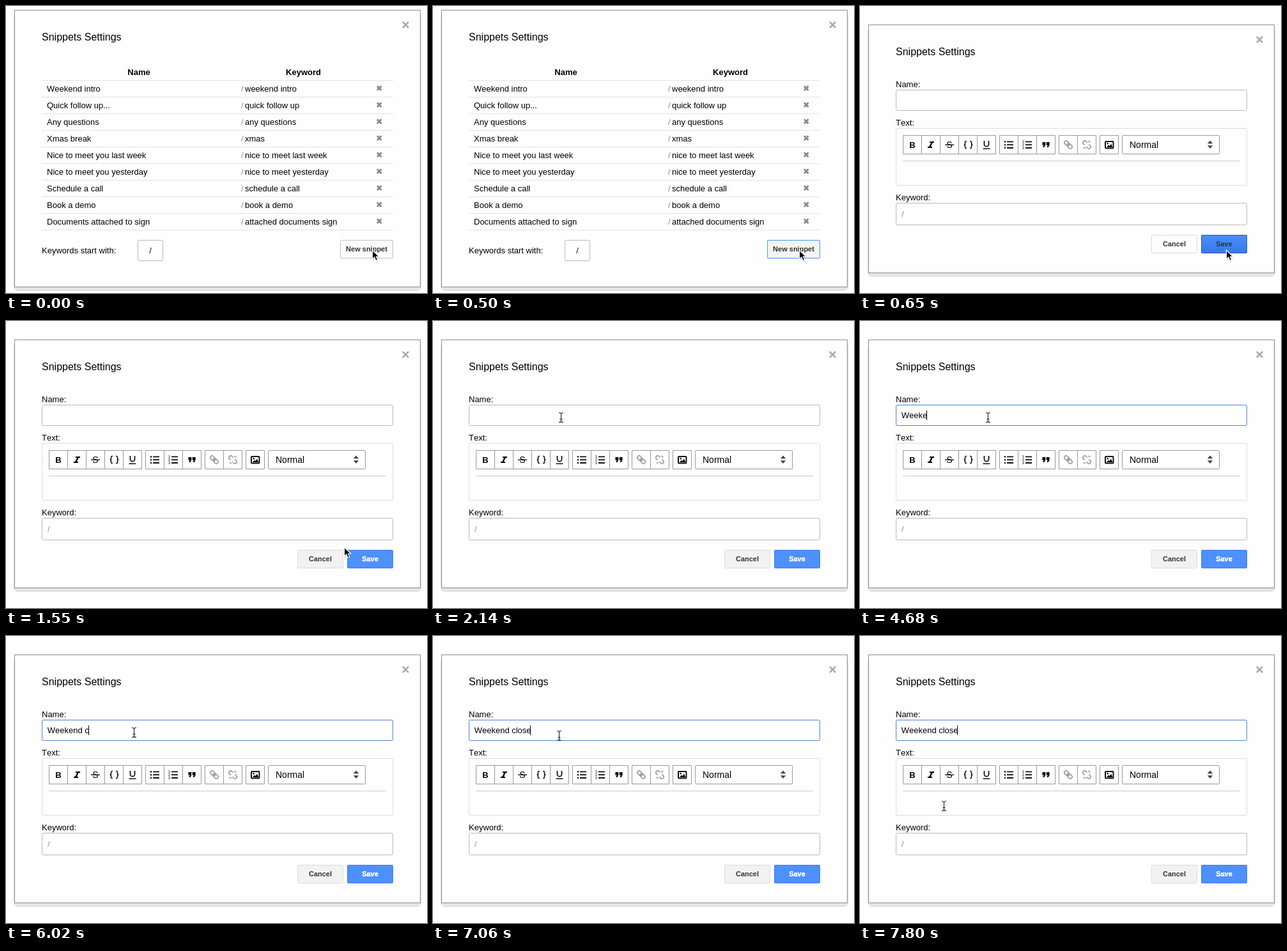
An HTML page that plays this animation: 659 px wide and 449 px high, repeating every 8000 ms.

```html
<!DOCTYPE html>
<html lang="en">
<head>
<meta charset="utf-8">
<title>Snippets Settings</title>
<style>
  html, body { margin: 0; width: 100%; height: 100%; overflow: hidden; background: #fff; }
  svg { display: block; width: 659px; height: 449px; }
  text { font: 13px "Liberation Sans", Arial, sans-serif; font-kerning: none; white-space: pre; }
  .title { font-size: 16px; }
  .bold { font-weight: bold; }
  .mid { text-anchor: middle; }
  .btn { font-size: 11px; font-weight: bold; text-anchor: middle; fill: #333; }
  .slash { fill: #8c8c8c; }
  .dialog { fill: #fefefe; stroke: #8e8e8e; }
  .shade { fill: #e4e4e4; }
  .field { fill: #fff; stroke: #b9b9b9; }
  .rule { stroke: #e3e3e3; }
  .group { fill: #fff; stroke: #999; }
  .ink { fill: none; stroke: #111; }
  .dim { fill: none; stroke: #999; stroke-width: 1.6; }

  .anim { animation: 8s step-end infinite; }
  .list { animation-name: list; }
  .press { animation-name: press; }
  .form { animation-name: form; }
  .hover { animation-name: hover; }
  .focus { animation-name: focus; }
  .typing { animation-name: typing; }
  .caret { animation-name: caret; }
  .pointer { animation-name: move; }
  .arrow { animation-name: arrow; }
  .beam { animation-name: beam; }

  @keyframes list { 0% { opacity: 1 } 8.125%, 100% { opacity: 0 } }
  @keyframes press { 0% { opacity: 0 } 6.25%, 100% { opacity: 1 } }
  @keyframes form { 0% { opacity: 0 } 8.125%, 100% { opacity: 1 } }
  @keyframes hover { 0% { opacity: 1 } 19.375%, 100% { opacity: 0 } }
  @keyframes focus { 0% { opacity: 0 } 34.25%, 100% { opacity: 1 } }
  @keyframes caret { 0% { opacity: 1 } 39.75% { opacity: 0 } 43.5%, 100% { opacity: 1 } }
  @keyframes typing {
    0% { transform: translateX(65px) }
    43.5% { transform: translateX(77px) }
    49.125% { transform: translateX(91px) }
    52.875% { transform: translateX(97px) }
    58.5% { transform: translateX(104px) }
    60.375% { transform: translateX(112px) }
    65.875% { transform: translateX(119px) }
    67.75% { transform: translateX(122px) }
    75.25% { transform: translateX(129px) }
    77.125% { transform: translateX(132px) }
    80.875% { transform: translateX(145px) }
    84.5%, 100% { transform: translateX(152px) }
  }
  @keyframes move {
    0% { transform: translate(573px, 382px) }
    19.375% { transform: translate(529px, 354px) }
    21.25% { transform: translate(416px, 285px) }
    23.125% { transform: translate(290px, 212px) }
    25% { transform: translate(216px, 170px) }
    26.75% { transform: translate(200px, 151px) }
    88.25% { transform: translate(197px, 156px) }
    90.125% { transform: translate(183px, 178px) }
    92% { transform: translate(160px, 215px) }
    93.875% { transform: translate(138px, 256px) }
    95.625% { transform: translate(127px, 276px) }
    97.5%, 100% { transform: translate(131px, 266px) }
  }
  @keyframes arrow { 0% { opacity: 1 } 26.75% { opacity: 0 } 90.125% { opacity: 1 } 93.875%, 100% { opacity: 0 } }
  @keyframes beam { 0% { opacity: 0 } 26.75% { opacity: 1 } 90.125% { opacity: 0 } 93.875%, 100% { opacity: 1 } }
</style>
</head>
<body>
<svg viewBox="0 0 659 449">
  <defs>
    <linearGradient id="blue" x2="0" y2="1">
      <stop stop-color="#4b8efc"/><stop offset="1" stop-color="#357ae8"/>
    </linearGradient>
    <path id="close" d="M-4.6 -4.6L4.6 4.6M4.6 -4.6L-4.6 4.6" stroke="#aaa" stroke-width="2.7"/>
    <path id="quote" d="M0 0h4.8v4.4l-1.9 3.6H.7l1.5-3.3H0z"/>
  </defs>

  <g class="anim list">
    <rect class="shade" x="11.5" y="10" width="639" height="436" rx="8"/>
    <rect class="dialog" x="13.5" y="6.5" width="635" height="433"/>
    <use href="#close" x="625.5" y="29.5"/>
    <text class="title" x="56" y="54">Snippets Settings</text>
    <text class="bold mid" x="208" y="108">Name</text>
    <text class="bold mid" x="465.5" y="108">Keyword</text>
    <path class="rule" d="M56 116.5H606"/>
    <g id="rows"></g>
    <text x="56" y="387">Keywords start with:</text>
    <rect class="field" x="206.5" y="366.5" width="39" height="32" rx="2"/>
    <text class="mid" x="226" y="387">/</text>
    <rect x="523.5" y="366.5" width="82" height="28" rx="1" fill="#fbfbfb" stroke="#c3c3c3"/>
    <rect class="anim press" x="523.5" y="366.5" width="82" height="28" rx="1" fill="#f4f4f4" stroke="#4d90fe"/>
    <text class="btn" x="564.5" y="384">New snippet</text>
  </g>

  <g class="anim form">
    <rect class="shade" x="11.5" y="33" width="639" height="391" rx="8"/>
    <rect class="dialog" x="13.5" y="29.5" width="635" height="388"/>
    <use href="#close" x="625.5" y="52.5"/>
    <text class="title" x="56" y="77">Snippets Settings</text>

    <text x="56" y="127">Name:</text>
    <rect class="field" x="56.5" y="131.5" width="549" height="32" rx="2"/>
    <g class="anim focus">
      <rect x="56.5" y="131.5" width="549" height="32" rx="2" fill="#fff" stroke="#4d83dc"/>
      <text x="64.7" y="152">Weekend close</text>
      <g class="anim typing">
        <rect x="1" y="138" width="100" height="20" fill="#fff"/>
        <rect class="anim caret" y="140" width="1" height="15"/>
      </g>
    </g>

    <text x="56" y="187">Text:</text>
    <rect x="56.5" y="191.5" width="549" height="89" rx="1" fill="#fefefe" stroke="#ddd"/>
    <path d="M67 242.5H595" stroke="#ccc"/>
    <g class="group">
      <path d="M67.5 202.5h145v29h-145zM96.5 202.5v29m29-29v29m29-29v29m29-29v29"/>
      <path d="M218.5 202.5h87v29h-87zM247.5 202.5v29m29-29v29"/>
      <path d="M311.5 202.5h58v29h-58zM340.5 202.5v29"/>
      <path d="M375.5 202.5h29v29h-29z"/>
      <rect x="410.5" y="202.5" width="152" height="29" rx="1"/>
    </g>

    <text class="bold mid" x="82" y="221.5">B</text>
    <path d="M109 212h7v2h-2.3l-2.8 6h2.1v2h-7v-2h2.3l2.8-6H109z"/>
    <text class="mid" x="140" y="222" style="font-size:14px">S</text>
    <path class="ink" d="M133 217.2h14" stroke-width="1.4"/>
    <path class="ink" stroke-width="1.6" d="M167 211.5h-1q-1.5 0-1.5 1.7v2q0 1.8-1.8 1.8 1.8 0 1.8 1.8v2q0 1.7 1.5 1.7h1M172 211.5h1q1.5 0 1.5 1.7v2q0 1.8 1.8 1.8-1.8 0-1.8 1.8v2q0 1.7-1.5 1.7h-1"/>
    <path class="ink" stroke-width="1.8" d="M194.5 211v5.2a3.5 3.5 0 0 0 7 0V211"/>
    <path class="ink" stroke-width="1.5" d="M192.5 223.3h11"/>

    <path class="ink" stroke-width="1.8" d="M230 212.4h10m-10 4.8h10m-10 4.8h10M259 212.4h10m-10 4.8h10m-10 4.8h10"/>
    <path class="ink" stroke-width="2.6" stroke-linecap="round" d="M227 212.4h.01m-.01 4.8h.01m-.01 4.8h.01"/>
    <g class="bold mid">
      <text x="255.5" y="214.4" style="font-size:6px">1</text>
      <text x="255.5" y="219.4" style="font-size:6px">2</text>
      <text x="255.5" y="224.4" style="font-size:6px">3</text>
    </g>
    <use href="#quote" x="285.5" y="213"/>
    <use href="#quote" x="291.8" y="213"/>

    <g class="dim" transform="translate(326 217) rotate(45)">
      <rect x="-7.5" y="-2.8" width="8" height="5.6" rx="2.8"/>
      <rect x="-.5" y="-2.8" width="8" height="5.6" rx="2.8"/>
      <path d="M-3 0h6"/>
    </g>
    <g class="dim" transform="translate(355 217) rotate(45)">
      <path d="M-2 -2.8h-2.7a2.8 2.8 0 0 0 0 5.6H-2M2 -2.8h2.7a2.8 2.8 0 0 1 0 5.6H2"/>
      <path d="M-1.5 -4.5l-.8-2.5M1.5 4.5l.8 2.5M0 -5v-3M0 5v3" stroke-width="1.2"/>
    </g>
    <rect class="ink" x="384" y="212" width="12.5" height="10.5" rx="1" stroke-width="2"/>
    <path d="M386 221l2.8-3.6 1.8 1.6 2.5-3.2 2.2 5.2z"/>
    <circle cx="387.6" cy="215.3" r="1.2"/>

    <text x="422" y="222" style="font-size:14px">Normal</text>
    <path d="M543.8 215.3l4.2-4.8 4.2 4.8zM543.8 218.3h8.4l-4.2 4.8z" fill="#444"/>

    <text x="56" y="304">Keyword:</text>
    <rect class="field" x="56.5" y="308.5" width="549" height="34" rx="2"/>
    <text class="slash" x="65" y="330">/</text>

    <rect x="456.5" y="358.5" width="71" height="28" rx="1" fill="#f2f2f2" stroke="#dcdcdc"/>
    <rect class="anim hover" x="456.5" y="358.5" width="71" height="28" rx="1" fill="#fdfdfd" stroke="#dcdcdc"/>
    <text class="btn" x="492" y="376">Cancel</text>
    <rect x="534.5" y="358.5" width="71" height="28" rx="1" fill="#4d90fe" stroke="#3f80ea"/>
    <text class="btn" x="570" y="376" style="fill:#fff;stroke:#fff;stroke-width:.4px">Save</text>
    <g class="anim hover">
      <rect x="534.5" y="358.5" width="71" height="28" rx="1" fill="url(#blue)" stroke="#2f5bb7"/>
      <text class="btn" x="570" y="376">Save</text>
    </g>
  </g>

  <g class="anim pointer">
    <g class="anim arrow">
      <path d="M1 2v14l3.3-2.8 2.2 5 2.6-1-2.1-5h4.5z" fill="#000" opacity=".2"/>
      <path d="M.5 0v14l3.3-3 2.2 5.2 2.7-1.1-2.2-5.1h4.4z" stroke="#fff" stroke-width="1.2"/>
    </g>
    <g class="anim beam" fill="none">
      <path d="M-3 -7.5q3.5 0 3.5 2V5.5q0 2 3.5 2M4 -7.5q-3.5 0-3.5 2V5.5q0 2-3.5 2M-1.5 2.5h4" stroke="#222" stroke-width="1.1"/>
    </g>
  </g>
</svg>
<script>
  const snippets = [
    ["Weekend intro", "weekend intro"],
    ["Quick follow up...", "quick follow up"],
    ["Any questions", "any questions"],
    ["Xmas break", "xmas"],
    ["Nice to meet you last week", "nice to meet last week"],
    ["Nice to meet you yesterday", "nice to meet yesterday"],
    ["Schedule a call", "schedule a call"],
    ["Book a demo", "book a demo"],
    ["Documents attached to sign", "attached documents sign"]
  ];
  document.getElementById("rows").innerHTML = snippets.map(([name, key], i) => `
    <g transform="translate(0 ${26 * i})">
      <text x="64" y="134">${name}</text>
      <text class="slash" x="368" y="134">/</text>
      <text x="374" y="134">${key}</text>
      <path d="M581 125.3l6.6 6.6m0-6.6l-6.6 6.6" stroke="#8a8a8a" stroke-width="2.8"/>
      <path class="rule" d="M56 142.5H606"/>
    </g>`).join("");
</script>
</body>
</html>
```
